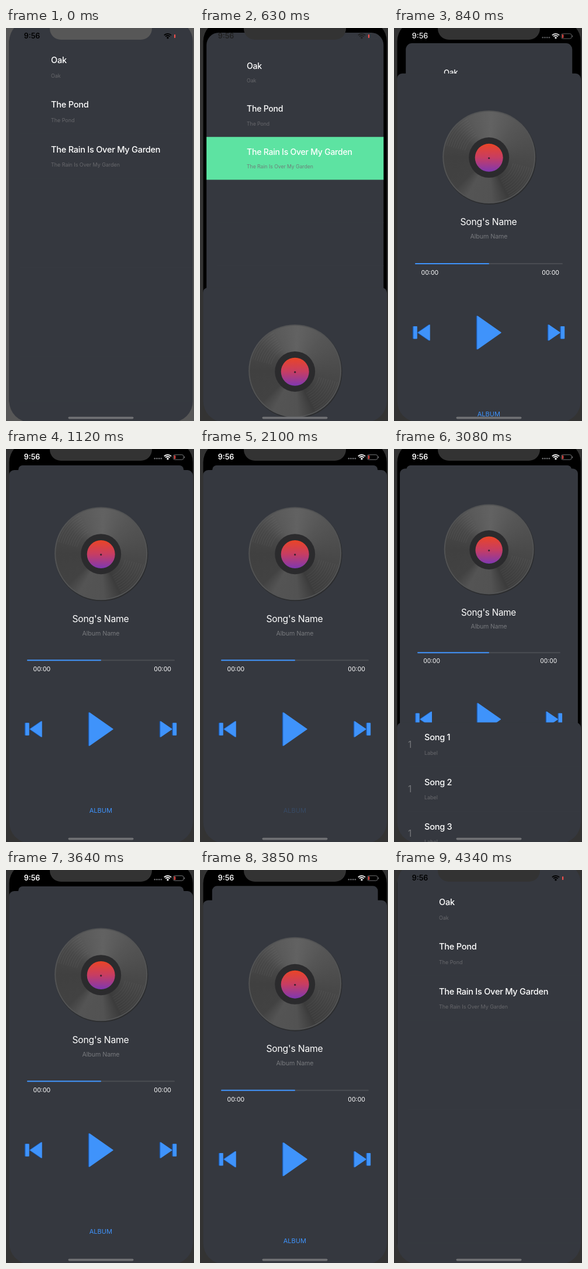
An HTML page with a canvas that plays this animation: 322x672 px, repeating every 4.41 s.

```html
<!DOCTYPE html>
<html lang="en">
<head>
<meta charset="utf-8">
<title>Music player</title>
<style>
  html, body { margin: 0; height: 100%; overflow: hidden; background: #000; }
  canvas { display: block; }
</style>
</head>
<body>
<canvas id="stage" width="322" height="672"></canvas>
<script>
const ctx = document.getElementById('stage').getContext('2d');
const W = 322, H = 672, LOOP = 4410, MID = 162.5;
const LEFT = 5.5, WIDTH = 314.5, SHEET_TOP = 36, PEEK_TOP = 28, ROW = 76.2;
const CARD = '#35383f', BLUE = '#3f93fb', DEEP_BLUE = '#1b57ab', GREY = 'rgba(112,112,115,.85)';
const SONGS = ['Oak', 'The Pond', 'The Rain Is Over My Garden'];

// Critically damped spring, 0 to 1
function spring(ms) {
  const x = ms * 0.015;
  return x <= 0 ? 0 : x > 7.4 ? 1 : 1 - (1 + x) * Math.exp(-x);
}

function text(str, x, y, size, color, { weight = 400, align = 'left', spacing = 0 } = {}) {
  ctx.font = `${weight} ${size}px Inter, sans-serif`;
  ctx.letterSpacing = spacing + 'px';
  ctx.textAlign = align;
  ctx.fillStyle = color;
  ctx.fillText(str, x, y);
}

function box(x, y, w, h, radius, color) {
  ctx.fillStyle = color;
  ctx.beginPath();
  ctx.roundRect(x, y, w, h, radius);
  ctx.fill();
}

function disc(x, y, r, fill) {
  ctx.fillStyle = fill;
  ctx.beginPath();
  ctx.arc(x, y, r, 0, 7);
  ctx.fill();
}

function arc(x, y, r, from, to) {
  ctx.beginPath();
  ctx.arc(x, y, r, from, to);
  ctx.stroke();
}

function layer(draw) {
  ctx.save();
  draw();
  ctx.restore();
}

// Scales a card about the centre line and moves its top edge
function recede(p, from, to) {
  const s = 1 - 0.1 * p;
  ctx.translate(MID, to);
  ctx.scale(s, s);
  ctx.translate(-MID, -from);
}

function separators(top) {
  for (let i = 1; i < 9; i++) box(24, top + i * ROW - 0.5, 296, 1, 0, '#373a41');
}

function row(title, label, x, top) {
  text(title, x, top + 31.6, 14.6, '#fff', { weight: 500, spacing: -0.28 });
  text(label, x, top + 56, 9, GREY, { spacing: -0.05 });
}

function songList(p, selected) {
  recede(p, 0, PEEK_TOP * p ** 0.85);
  box(LEFT, -6 * (1 - p), WIDTH, H + 80, 8 + 60 * p * (1 - p), CARD);
  separators(28.5);
  if (selected) box(LEFT, 28.5 + 2 * ROW, WIDTH, ROW, 0, '#5de3a2');
  SONGS.forEach((song, i) => row(song, song, 77, 28.5 + i * ROW));
}

function sheet() {
  box(LEFT - 0.5, SHEET_TOP, WIDTH + 0.5, H + 40, [9, 9, 0, 0], CARD);
}

function albumList() {
  sheet();
  separators(35.5);
  for (let i = 0; i < 3; i++) {
    const top = 35.5 + i * ROW;
    row('Song ' + (i + 1), 'Label', 52, top);
    text('1', 24, top + 44, 15.5, '#74767a');
  }
}

function vinyl() {
  const x = 162.7, y = 178.7;
  disc(x + 0.8, y + 1.3, 80, '#2b2c2e');
  disc(x, y, 79.5, '#525354');
  const shine = ctx.createConicGradient(0, x, y);
  [[0, 74], [.1, 66], [.18, 60], [.24, 82], [.33, 84], [.38, 66], [.5, 64],
   [.6, 72], [.68, 90], [.76, 98], [.86, 86], [1, 74]]
    .forEach(([at, v]) => shine.addColorStop(at, `rgb(${v},${v},${v})`));
  disc(x, y, 77.5, shine);
  // Light catches the grooves on two opposite sides
  ctx.lineWidth = 1;
  ctx.strokeStyle = 'rgba(255,255,255,.06)';
  for (let r = 43; r < 76; r += 4) {
    arc(x, y, r, 0.25, 1.1);
    arc(x, y, r, 3.4, 4.2);
  }
  disc(x, y + 1, 34.5, '#2b2b2d');
  const label = ctx.createLinearGradient(0, y - 23, 0, y + 25);
  label.addColorStop(0, '#ea4526');
  label.addColorStop(0.5, '#c73d62');
  label.addColorStop(1, '#8038b0');
  disc(x, y + 1.3, 24, label);
  disc(x, y + 2, 1.6, '#3c2230');
}

// Blue polygon with rounded joins over a darker offset copy
function icon(...shapes) {
  for (const [shift, color] of [[-1.5, DEEP_BLUE], [0, BLUE]]) {
    ctx.fillStyle = ctx.strokeStyle = color;
    ctx.lineWidth = 1.5;
    ctx.lineJoin = 'round';
    for (const points of shapes) {
      ctx.beginPath();
      points.forEach(([x, y]) => ctx.lineTo(x + shift, y));
      ctx.closePath();
      ctx.fill();
      ctx.stroke();
    }
  }
}

const bar = (x, w) => [[x, 469], [x + w, 469], [x + w, 489], [x, 489]];

function player(pressed) {
  sheet();
  vinyl();
  text("Song's Name", 162, 295.5, 15.7, '#fff', { align: 'center', spacing: -0.2 });
  text('Album Name', 162.5, 318.5, 10.7, '#77797d', { align: 'center', spacing: -0.1 });
  box(36, 360.2, 253, 2, 1, '#4a4c52');
  box(36, 360.2, 127, 2, 1, BLUE);
  text('00:00', 46.5, 380, 10.6, '#fff');
  text('00:00', 283, 380, 10.6, '#fff', { align: 'right' });
  icon(bar(34, 5), [[42, 479], [61, 466], [61, 492]]);
  icon([[143, 451], [183, 479], [143, 507]]);
  icon([[265, 466], [284, 479], [265, 492]], bar(286.5, 5));
  ctx.globalAlpha = pressed ? 0.2 : 1;
  text('ALBUM', 162.3, 622, 11, BLUE, { align: 'center' });
  ctx.globalAlpha = 1;
}

function statusBar(light) {
  const v = Math.round(255 * light * light), ink = `rgb(${v},${v},${v})`;
  text('9:56', 44.5, 18.3, 12.5, ink, { weight: 600, align: 'center' });
  ctx.strokeStyle = ink;
  ctx.lineWidth = 1.8;
  for (const r of [5.2, 8.4]) arc(277, 18.2, r, -Math.PI * 0.76, -Math.PI * 0.24);
  disc(277, 16.8, 1.7, ink);
  ctx.globalAlpha = light ** 3;
  for (let i = 0; i < 4; i++) disc(254.8 + i * 3.7, 16.3, 1.3, '#6c6d70');
  ctx.strokeStyle = '#77787a';
  ctx.lineWidth = 1;
  ctx.beginPath();
  ctx.roundRect(286.5, 9.8, 17.5, 8.4, 2.6);
  ctx.stroke();
  box(305, 12.5, 1.2, 3, 0.6, '#77787a');
  ctx.globalAlpha = 1;
  box(288, 11, 2.2, 6, 0.8, '#f0504c');
}

function bezel(color) {
  ctx.fillStyle = color;
  ctx.beginPath();
  ctx.rect(0, 0, W, H);
  ctx.roundRect(LEFT, -13, WIDTH, 687, 36);
  ctx.fill('evenodd');
  box(75, -40, 175, 60, 19, color);
}

function draw(t) {
  const first = spring(t - 547) - spring(t - 3835);
  const second = spring(t - 2131) - spring(t - 2925);
  const slide = p => ctx.translate(0, (H - SHEET_TOP) * (1 - p));

  ctx.fillStyle = '#000';
  ctx.fillRect(0, 0, W, H);
  layer(() => songList(first, t >= 420 && t < 1200));
  if (first > 0) layer(() => {
    slide(first);
    recede(second, SHEET_TOP, SHEET_TOP + (PEEK_TOP - SHEET_TOP) * second);
    player(t >= 2030 && t < 2400);
  });
  if (second > 0) layer(() => {
    slide(second);
    albumList();
  });
  statusBar(first);
  bezel(t < 420 ? '#575757' : '#333');
  box(106.5, 664.8, 112, 3.6, 1.8, '#707174');
}

function tick(now) {
  draw(now % LOOP);
  requestAnimationFrame(tick);
}
requestAnimationFrame(tick);
</script>
</body>
</html>
```
